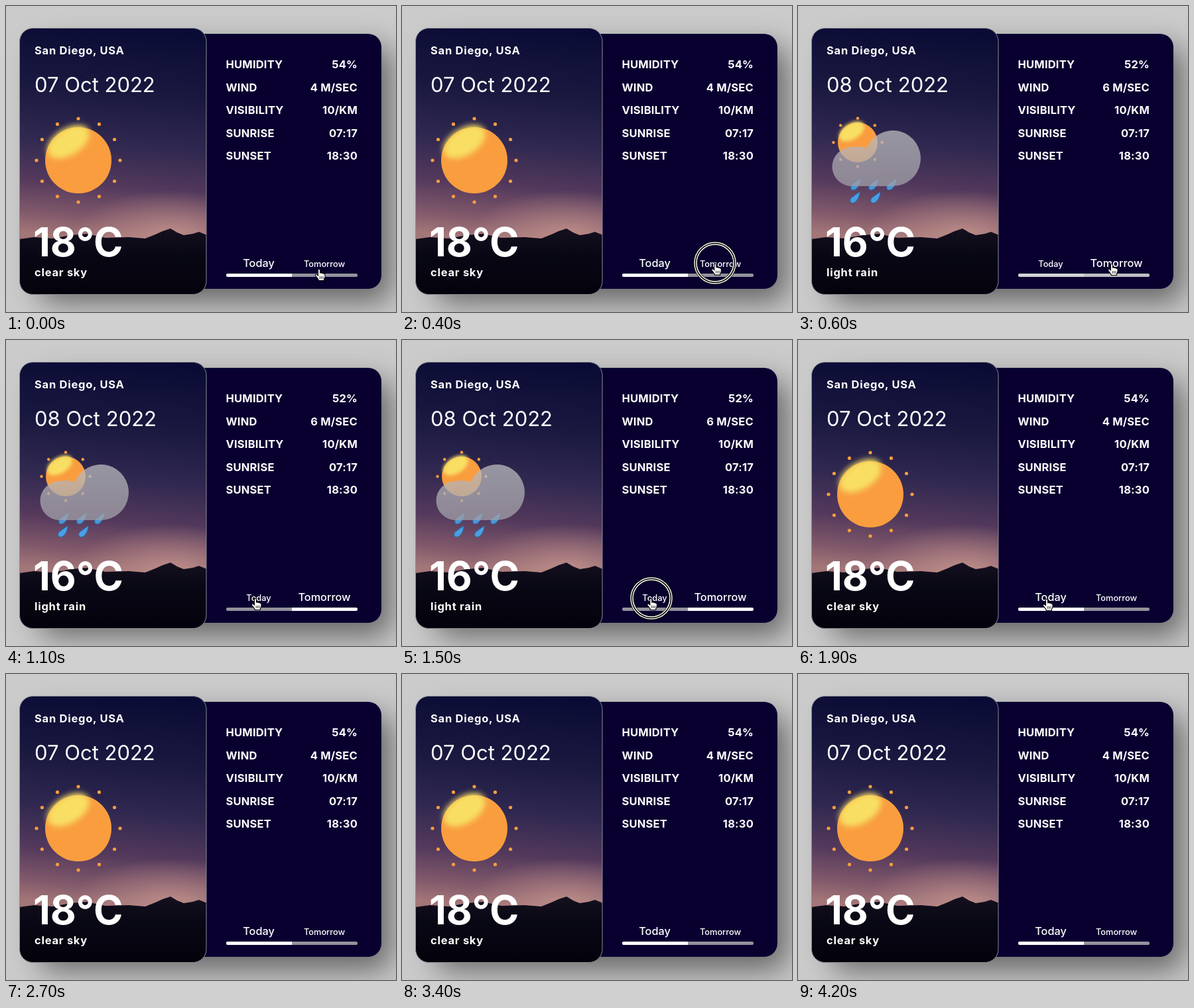
Animation of 588 by 462 pixels, one loop 4.3 s. Source, as an HTML page:

```html
<!DOCTYPE html>
<html lang="en">
<head>
<meta charset="utf-8">
<title>Weather card</title>
<style>
  html, body { margin: 0; width: 100%; height: 100%; overflow: hidden; background: #cbcbcb; }
  .shadow {
    position: absolute; left: 36px; top: 42px; width: 530px; height: 385px;
    border-radius: 20px; box-shadow: 15px 20px 45px rgba(0, 0, 0, .5);
  }
  svg { position: absolute; left: 0; top: 0; }
  text { font-family: Inter, "Open Sans", sans-serif; fill: #fff; }
  .bold { font-size: 16.5px; font-weight: 700; }
  .wide { letter-spacing: .75px; }
  .row { letter-spacing: .2px; }
  .end { text-anchor: end; }
  .tab { text-anchor: middle; font-weight: 500; }
  #date { font-size: 31px; }
  #temp { font-size: 60px; font-weight: 700; }
</style>
</head>
<body>
<div class="shadow"></div>
<svg width="588" height="462" viewBox="0 0 588 462">
  <defs>
    <linearGradient id="sky" gradientUnits="userSpaceOnUse" x1="170" y1="30" x2="140" y2="352">
      <stop offset="0" stop-color="#0a0b35"/>
      <stop offset=".3" stop-color="#19183f"/>
      <stop offset=".55" stop-color="#302850"/>
      <stop offset=".75" stop-color="#54395c"/>
      <stop offset=".9" stop-color="#80586a"/>
      <stop offset="1" stop-color="#a37678"/>
    </linearGradient>
    <radialGradient id="glow" gradientUnits="userSpaceOnUse" cx="250" cy="345" r="150"
      gradientTransform="matrix(1 0 0 .45 0 190)">
      <stop offset="0" stop-color="#cb9a90" stop-opacity=".75"/>
      <stop offset="1" stop-color="#cb9a90" stop-opacity="0"/>
    </radialGradient>
    <linearGradient id="hills" x2="0" y2="1">
      <stop offset="0" stop-color="#15101f"/>
      <stop offset=".4" stop-color="#080714"/>
      <stop offset="1" stop-color="#03020c"/>
    </linearGradient>
    <linearGradient id="vapour" x2="0" y2="1">
      <stop offset="0" stop-color="#bdbcc0"/>
      <stop offset="1" stop-color="#a09fa6"/>
    </linearGradient>
    <filter id="soft" x="-30%" y="-30%" width="160%" height="160%"><feGaussianBlur stdDeviation="4"/></filter>
    <filter id="edge"><feGaussianBlur stdDeviation=".6"/></filter>
    <clipPath id="card"><rect x="20.5" y="33.5" width="281.5" height="402" rx="20"/></clipPath>
    <path id="drop" d="M7-9C7-1 2 8-4 8C-9 7-8 1-4-1Z" fill="#4a9fe4" stroke="#246bab"/>
  </defs>

  <path d="M290 42H546a20 20 0 0 1 20 20V407a20 20 0 0 1-20 20H290Z" fill="#090030"/>
  <g clip-path="url(#card)">
    <rect x="20" y="33" width="283" height="403" fill="url(#sky)"/>
    <rect x="20" y="200" width="283" height="200" fill="url(#glow)"/>
    <path d="M20 352L42 349 70 351 98 346 122 344 150 350 185 349 210 351 225 345 236 340 248 336 258 342 268 346 281 344 291 341 303 346V436H20Z" fill="url(#hills)"/>
  </g>
  <rect x="20.5" y="33.5" width="281.5" height="402" rx="20" fill="none" stroke="#8b8a94"/>

  <text class="bold wide" x="43" y="73">San Diego, USA</text>
  <text id="date" x="43" y="129.5"></text>
  <text id="temp" x="41" y="378"></text>
  <text id="sky-text" class="bold wide" x="43" y="408"></text>

  <g id="sun"></g>
  <g id="rain">
    <g id="small-sun"></g>
    <use href="#drop" x="87" y="270" opacity=".9"/>
    <use href="#drop" x="114" y="270" opacity=".9"/>
    <use href="#drop" x="141" y="270" opacity=".9"/>
    <path d="M81 272A29.5 29.5 0 0 1 81 213Q94 211 104 214.3A42 42 0 1 1 143 272Z" fill="url(#vapour)" opacity=".75"/>
    <use href="#drop" x="86" y="289.5"/>
    <use href="#drop" x="117" y="289.5"/>
  </g>

  <g id="rows"></g>
  <text id="today" class="tab" x="381" y="394">Today</text>
  <text id="tomorrow" class="tab" x="480" y="394">Tomorrow</text>
  <path id="bar-left" d="M431 404H334a2 2 0 0 0-2 2v1a2 2 0 0 0 2 2H431Z"/>
  <path id="bar-right" d="M431 404H528a2 2 0 0 1 2 2v1a2 2 0 0 1-2 2H431Z"/>

  <g id="ring" fill="none">
    <circle r="29.5" stroke="#000" stroke-width="6"/>
    <circle r="31" stroke="#f4f2e6" stroke-width="1.5"/>
    <circle r="28" stroke="#fff" stroke-width="1.5"/>
  </g>
  <g id="cursor">
    <path d="M-1.5 1.2Q0-.8 1.5 1.2V6Q3.2 5 4.2 6.5Q6 5.6 6.8 7.2Q9 6.6 9 9V12Q8.500 14 7.500 15.500V17.500H-1V16L-5.500 10Q-5.500 7.500-3 8.500L-1.500 10Z"
      fill="#fff" stroke="#000" stroke-width="1.1"/>
    <path d="M1.300 11v4M3.600 11v4M5.900 11v4" stroke="#000" stroke-width=".8"/>
  </g>
</svg>
<script>
const LOOP = 4300, STEP = 100;
const $ = id => document.getElementById(id);

const days = [
  { date: "07 Oct 2022", temp: "18°C", sky: "clear sky", humidity: "54%", wind: "4 M/SEC" },
  { date: "08 Oct 2022", temp: "16°C", sky: "light rain", humidity: "52%", wind: "6 M/SEC" }
];

// Cursor tip: [time, x, y]
const path = [[0, 472, 397], [300, 472, 388.5], [600, 473, 389], [1000, 376, 390], [1800, 375, 390], [2100, 375, 393]];

function sunMarkup(cx, cy, r, count, orbit, dot) {
  let dots = "";
  for (let i = 0; i < count; i++) {
    const a = i * 2 * Math.PI / count;
    dots += `<circle cx="${cx + orbit * Math.cos(a)}" cy="${cy + orbit * Math.sin(a)}" r="${dot}"/>`;
  }
  const k = r / 50;
  return `<g fill="#f99d3f" filter="url(#edge)">${dots}<circle cx="${cx}" cy="${cy}" r="${r}"/></g>
    <g transform="translate(${cx - 15 * k} ${cy - 28 * k}) rotate(-32) scale(${k})">
      <ellipse rx="35" ry="20" fill="#f8df64" filter="url(#soft)"/></g>`;
}

$("sun").innerHTML = sunMarkup(109, 233, 50, 12, 63, 2.6);
$("small-sun").innerHTML = sunMarkup(90, 206, 30, 8, 36.5, 2.2);

$("rows").innerHTML = [
  ["HUMIDITY", ""], ["WIND", ""], ["VISIBILITY", "10/KM"], ["SUNRISE", "07:17"], ["SUNSET", "18:30"]
].map(([label, value], i) => {
  const y = 94 + 34.5 * i;
  return `<text class="bold row" x="331.5" y="${y}">${label}</text>
    <text class="bold row end" id="value${i}" x="530" y="${y}">${value}</text>`;
}).join("");

const ramp = (t, from, to) => Math.min(1, Math.max(0, (t - from) / (to - from)));
const mix = (a, b, k) => a + (b - a) * k;
const barColor = k => `rgb(${mix(148, 255, k)},${mix(146, 255, k)},${mix(156, 255, k)})`;

function cursorAt(t) {
  const i = Math.max(1, path.findIndex(p => p[0] >= t));
  const [t0, x0, y0] = path[i - 1], [t1, x1, y1] = path[i];
  const k = ramp(t, t0, t1), eased = k * k * (3 - 2 * k);
  return `translate(${mix(x0, x1, eased)} ${mix(y0, y1, eased)})`;
}

const show = (id, on) => $(id).style.display = on ? "" : "none";

function draw(t) {
  const rainy = t >= 520 && t < 1580;
  const day = days[+rainy];
  $("date").textContent = day.date;
  $("temp").textContent = day.temp;
  $("sky-text").textContent = day.sky;
  $("value0").textContent = day.humidity;
  $("value1").textContent = day.wind;
  show("sun", !rainy);
  show("rain", rainy);

  $("today").style.fontSize = rainy ? "12.8px" : "16.3px";
  $("tomorrow").style.fontSize = rainy ? "16.3px" : "12.8px";
  const slide = ramp(t, 520, 720) - ramp(t, 1580, 1780);
  $("bar-left").style.fill = barColor(1 - slide);
  $("bar-right").style.fill = barColor(slide);

  const visible = t <= 2100;
  show("cursor", visible);
  if (visible) $("cursor").setAttribute("transform", cursorAt(t));
  const first = t >= 350 && t < 550;
  show("ring", first || (t >= 1350 && t < 1550));
  $("ring").setAttribute("transform", first ? "translate(472 388)" : "translate(376 390)");
}

const start = performance.now();
function tick() {
  const t = (performance.now() - start) % LOOP;
  draw(Math.floor(t / STEP) * STEP);
  requestAnimationFrame(tick);
}
tick();
</script>
</body>
</html>
```
